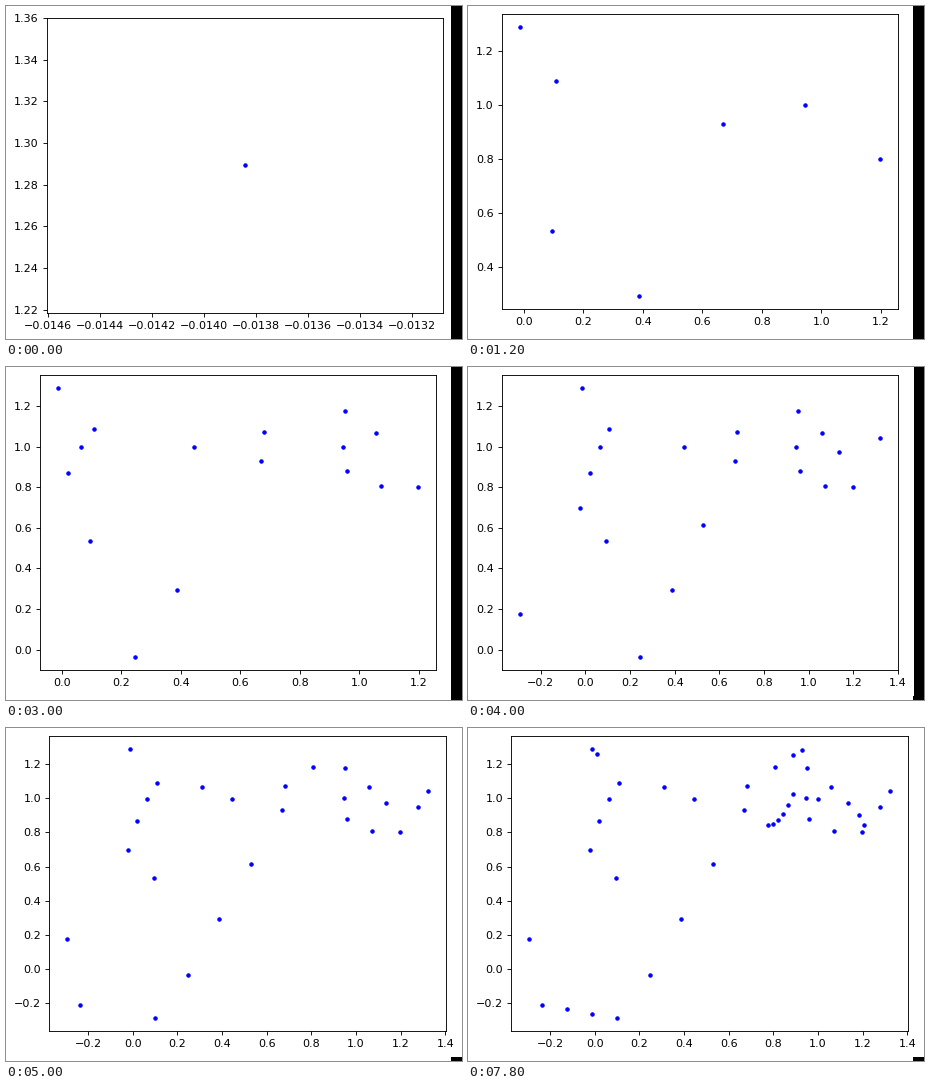
A matplotlib script for the animation above (8 s loop, 456 by 333 pixels).

```python
import matplotlib.pyplot as plt
import numpy as np
from matplotlib.animation import FuncAnimation
from matplotlib.patches import Rectangle

DPI = 80
W, H = 456, 333
AX_W, AX_H = 0.775 * 512, 0.77 * 384
PAD = 8


def run(start, end, n, bend=(0, 0)):
    """n even steps from start to end, bowed by bend at the middle."""
    s = np.linspace(0, 1, n)[:, None]
    return start + s * np.subtract(end, start) + 4 * s * (1 - s) * np.array(bend)


# The scatter lies along six short arcs, with a few loose dots around them.
left = run((-0.022, 0.698), (0.108, 1.089), 4, (0, 0.045))
slope = run((0.246, -0.0355), (0.669, 0.93), 4, (0, 0.008))
rim = run((0.951, 1.178), (1.1986, 0.801), 6, (0.089, -0.054))
arch = run((0.68, 1.073), (0.928, 1.285), 4, (0.05, 0.047))
hook = run((0.775, 0.843), (0.888, 1.027), 6, (0, -0.047))
base = run((-0.237, -0.212), (0.0995, -0.287), 4)

# Order of appearance: one more dot with every frame.
points = np.array([
    (-0.013842, 1.2893), left[3], (0.0945, 0.534), *slope[1::2],
    (0.945, 1.0), rim[5],
    rim[1], rim[0], slope[0], (0.444, 0.998), arch[0], left[2], left[1],
    (0.959, 0.88), (1.073, 0.807),
    (-0.294, 0.176), slope[2], rim[2], (1.3202, 1.043), left[0],
    (0.31, 1.066), arch[1], base[0], (1.278, 0.951), base[3],
    (0.01, 1.262), arch[3], *hook[::2], base[1], (1.0, 0.996), rim[3],
    rim[4], *hook[1:4:2], base[2], hook[5], arch[2],
])

plt.rcParams["font.family"] = "DejaVu Sans"
fig = plt.figure(figsize=(W / DPI, H / DPI), dpi=DPI, facecolor="black")
ax = fig.add_axes([0.1, 0.1, AX_W / W, AX_H / H])
dots, = ax.plot([], [], "b.")


def white_box(w, h):
    box = Rectangle((0, H - h), w, h, color="white", lw=0, transform=None,
                    antialiased=False, zorder=-1)
    return fig.add_artist(box)


white_box(445, H)
page = white_box(445, H)


def fit_page():
    """Shift the axes so that labels and padding start at the top left."""
    tight, inner = ax.get_tightbbox(), ax.bbox
    w, h = int(tight.width + 2 * PAD), int(tight.height + 2 * PAD)
    x = PAD + inner.x0 - tight.x0
    y = H - h + PAD + inner.y0 - tight.y0
    ax.set_position([x / W, y / H, AX_W / W, AX_H / H])
    page.set_bounds(0, H - h, w, h)


def update(i):
    dots.set_data(*points[:i + 1].T)
    ax.relim()
    ax.autoscale_view()
    fit_page()
    return dots, page


anim = FuncAnimation(fig, update, frames=len(points), interval=200, repeat=True,
                     repeat_delay=0, blit=False)
plt.show()
```
